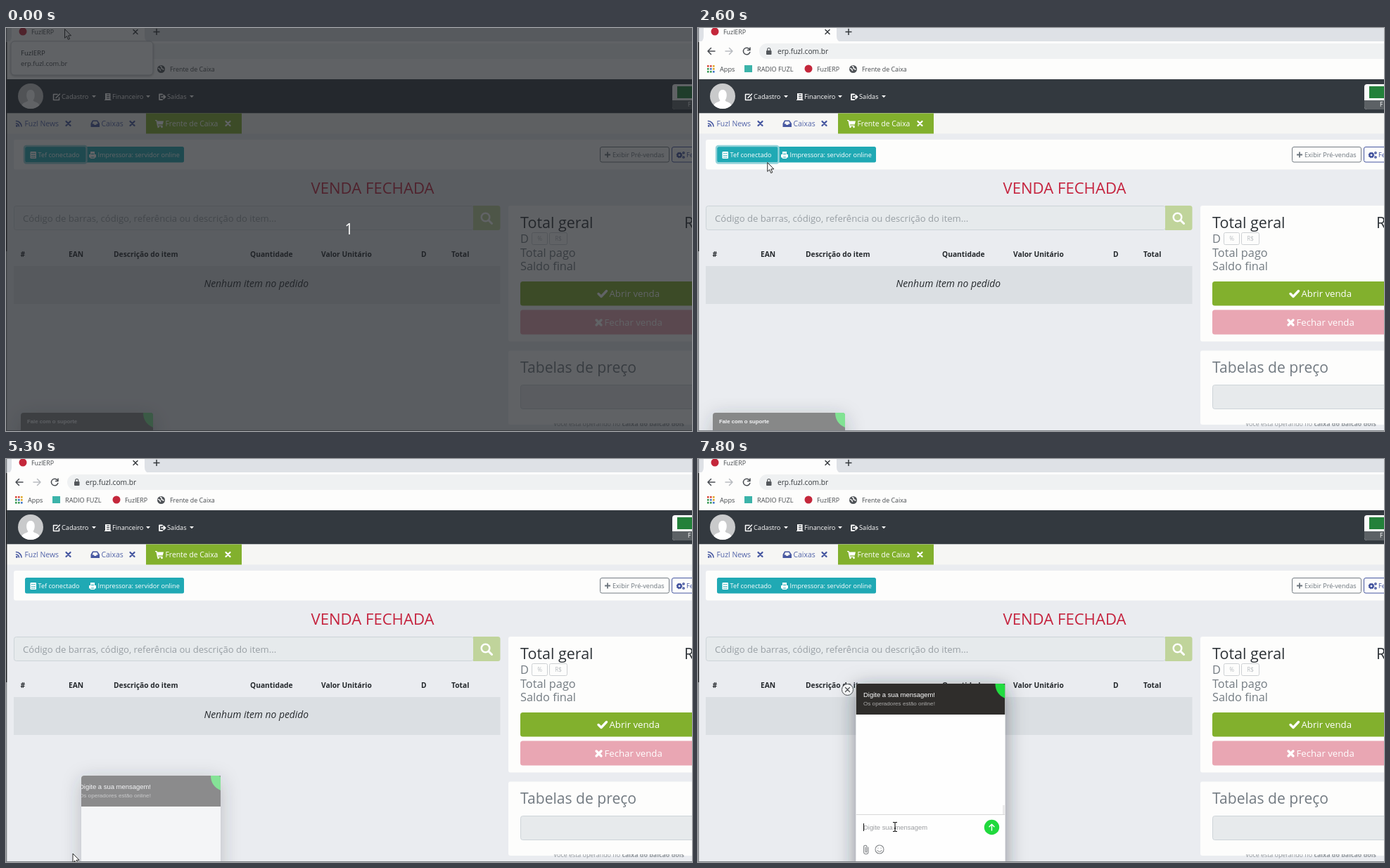
An HTML page for the animation above (8 s loop, 975 px wide and 574 px high).

```html
<!DOCTYPE html>
<html lang="pt-BR">
<head>
<meta charset="utf-8">
<title>Frente de Caixa</title>
<style>
html, body { margin: 0; width: 100%; height: 100%; overflow: hidden; background: #eaecf0; }
svg { display: block; width: 100%; height: 100%; }
text { font-family: "Open Sans", "Noto Sans", sans-serif; white-space: pre; }
.chat text { font-family: "Liberation Sans", Arial, sans-serif; }
.th text { font-size: 10.25px; font-weight: 700; fill: #24282c; }
.line { fill: none; stroke-linecap: round; stroke-linejoin: round; }
</style>
</head>
<body>
<svg viewBox="0 0 975 574" xmlns="http://www.w3.org/2000/svg">
  <defs>
    <filter id="soft" x="-40%" y="-40%" width="180%" height="180%">
      <feDropShadow dx="0" dy="6" stdDeviation="14" flood-color="#1c2630" flood-opacity=".5"/>
    </filter>
    <filter id="tipShade" x="-10%" y="-20%" width="120%" height="150%">
      <feDropShadow dx="0" dy="1" stdDeviation="1.5" flood-opacity=".3"/>
    </filter>
    <clipPath id="popClip"><rect id="popClipBox" width="212" height="260"/></clipPath>
    <clipPath id="footClip"><rect x="714" y="563" width="261" height="10"/></clipPath>
    <path id="cross" class="line" d="M-3-3L3 3M3-3L-3 3"/>
    <path id="caret" d="M-3-1.5H3L0 1.7z" fill="#fff"/>
    <path id="leaf" d="M198 0H208.500Q212 0 212 3.500V21C203 17 198 10 198 0z" fill="#22db40"/>
  </defs>

  <rect width="975" height="574" fill="#eaecf0"/>

  <!-- browser -->
  <rect width="975" height="20" fill="#dee1e6"/>
  <path d="M2 20Q8 19 8 12V0H197V12Q197 19 204 20z" fill="#fdfdfd"/>
  <rect y="19" width="975" height="54" fill="#fdfdfc"/>
  <circle cx="24" cy="5" r="5.5" fill="#c4273b"/>
  <text x="36" y="8.500" font-size="8.85" fill="#45494d">FuzlERP</text>
  <use href="#cross" x="184" y="5.500" stroke="#35393d" stroke-width="1.5"/>
  <path d="M209.500 5.500H218.500M214 1V10" stroke="#35393d" stroke-width="1.5"/>
  <g class="line" stroke="#4b4f54" stroke-width="1.5">
    <path d="M24 33H14M18.500 28.500L14 33L18.500 37.500"/>
    <path d="M39 33H49M44.500 28.500L49 33L44.500 37.500" stroke="#b9bcc0"/>
    <path d="M73 30A4.800 4.800 0 1 0 73.800 34.500M74 28V31.500H70.500"/>
  </g>
  <rect x="87" y="22" width="920" height="22" rx="11" fill="#eff1f2"/>
  <rect x="97" y="32" width="7.500" height="6" rx="1" fill="#53575b"/>
  <path d="M98.700 32V30.500a2 2 0 0 1 4 0V32" fill="none" stroke="#53575b" stroke-width="1.2"/>
  <text x="113" y="36.800" font-size="10.2" fill="#34383c">erp.fuzl.com.br</text>
  <g id="apps"></g>
  <text x="31" y="61.500" font-size="9.2" fill="#45494d">Apps</text>
  <rect x="66" y="53" width="11" height="10" fill="#3bb3a9"/>
  <text x="84" y="61.500" font-size="9.15" fill="#45494d">RADIO FUZL</text>
  <circle cx="157" cy="58" r="5.500" fill="#c4273b"/>
  <text x="169" y="61.500" font-size="8.85" fill="#45494d">FuzlERP</text>
  <circle cx="220.500" cy="58.500" r="5.500" fill="#4f5357"/>
  <path d="M216.500 57.500Q219 58 219.500 60.500M219.500 54.500Q222 55.500 221 57.500L224 59" class="line" stroke="#f4f4f4" stroke-width="1.5"/>
  <text x="233" y="61.500" font-size="8.85" fill="#45494d">Frente de Caixa</text>

  <!-- navigation bar -->
  <rect y="73" width="975" height="48.500" fill="#33393f"/>
  <circle cx="35" cy="97" r="18" fill="#c9cacb"/>
  <path d="M22.500 110C24 105 30 106 31.500 103C28 99 28 88 35 88S42 99 38.500 103C40 106 46 105 47.500 110A18 18 0 0 1 22.500 110z" fill="#fff"/>
  <g class="line" stroke="#fff" stroke-width="1.500">
    <path d="M73 94.500H67.500V102.500H75.500V99M71 99.500L76.500 94"/>
    <path d="M222 94.500H218V102H222M221 98.200H226M224 95.700L226.500 98.200L224 100.700" stroke-width="1.800"/>
  </g>
  <path d="M141 93H148.500V102H149.500V103H140V102H141z" fill="#fff"/>
  <path d="M143 95H147M143 97.500H147M143 100H147" stroke="#33393f"/>
  <g font-size="9.2" fill="#fff">
    <text x="79" y="101.300">Cadastro</text>
    <text x="151" y="101.300">Financeiro</text>
    <text x="229" y="101.300">Saídas</text>
  </g>
  <use href="#caret" x="125" y="97.500"/>
  <use href="#caret" x="202" y="97.500"/>
  <use href="#caret" x="264" y="97.500"/>
  <rect x="947" y="80" width="40" height="36" rx="4" fill="#fbfbfb"/>
  <path d="M947 103H975V116H951Q947 116 947 112z" fill="#5c6165"/>
  <rect x="954" y="83" width="21" height="17" fill="#23813a"/>
  <text x="969" y="112" font-size="8.5" fill="#fff">F</text>

  <!-- page tabs -->
  <rect y="121.500" width="975" height="29" fill="#f6f6f4"/>
  <rect x="199" y="121.500" width="136" height="29" fill="#82b02d"/>
  <g class="line" stroke="#4657a0" stroke-width="1.600">
    <path d="M14.500 132.500A8 8 0 0 1 22 140M14.500 136A4.500 4.500 0 0 1 18.500 140"/>
    <circle cx="15.300" cy="139.500" r=".6"/>
  </g>
  <path d="M123 131.500H130L133 136V141H120.500V136zM124 133L122.500 136.500H124.500L125.500 138H128L129 136.500H131L129.300 133z" fill="#4657a0" fill-rule="evenodd"/>
  <g font-size="10.4" fill="#5264a9">
    <text x="26.500" y="140">Fuzl News</text>
    <text x="135.500" y="140">Caixas</text>
    <text x="226.500" y="140" fill="#fff">Frente de Caixa</text>
  </g>
  <use href="#cross" x="88.500" y="136" stroke="#4657a0" stroke-width="2.300"/>
  <use href="#cross" x="179.500" y="136" stroke="#4657a0" stroke-width="2.300"/>
  <use href="#cross" x="315.500" y="136" stroke="#fff" stroke-width="2.300"/>
  <path d="M212 131H214.500L215 132.500H224L222.700 137.500H216L216.300 138.700H222.500V140H215L213.500 132.300H212z" fill="#fff"/>
  <circle cx="216.500" cy="141" r="1.300" fill="#fff"/>
  <circle cx="221.500" cy="141" r="1.300" fill="#fff"/>

  <!-- status card -->
  <rect x="11" y="159" width="980" height="42.500" rx="3" fill="#fdfdfc"/>
  <rect x="27" y="169" width="226" height="22.500" rx="2.500" fill="#20a9b4"/>
  <rect id="hot" x="27" y="169" width="87" height="22.500" rx="2.500" fill="#168f9c"/>
  <rect id="ring" x="26" y="168" width="88.500" height="24.500" rx="3" fill="none" stroke="#94d3da" stroke-width="2.400"/>
  <rect x="34.500" y="176" width="8.500" height="10" rx="1" fill="#fff"/>
  <path d="M36 178.500H41.500M36 181.500H41.500M36 184H41.500" stroke="#20a9b4" stroke-width="1.200" stroke-dasharray="1.500 .5"/>
  <path d="M120 180V176H126V180H128V184.500H126V186H120V184.500H118V180z" fill="#fff"/>
  <path d="M121 179.500H125M121 184H125" stroke="#20a9b4"/>
  <g font-size="9.1" fill="#fff">
    <text x="45.500" y="184.300">Tef conectado</text>
    <text x="130.500" y="184.300">Impressora: servidor online</text>
  </g>
  <rect x="844.500" y="169.500" width="98" height="21.500" rx="2.500" fill="none" stroke="#747c83"/>
  <path d="M851 180.500H859M855 176.500V184.500" stroke="#6c757d" stroke-width="1.800"/>
  <text x="862" y="184.300" font-size="9.15" fill="#6c757d">Exibir Pré-vendas</text>
  <rect x="946.500" y="169.500" width="60" height="21.500" rx="2.500" fill="none" stroke="#4657a0"/>
  <g fill="none" stroke="#3c4d9b">
    <circle cx="957" cy="181" r="2.600" stroke-width="2.200"/>
    <circle cx="957" cy="181" r="3.900" stroke-dasharray="1.500 1.560"/>
    <circle cx="963" cy="177.800" r="1.200" stroke-width="1.300"/>
    <circle cx="963" cy="184" r="1.200" stroke-width="1.300"/>
  </g>
  <text x="967" y="184.300" font-size="9.15" fill="#3c4d9b">Fechar</text>

  <!-- sale area -->
  <text x="433.500" y="236.300" font-size="22.1" fill="#c5243f">VENDA FECHADA</text>
  <rect x="11.500" y="253.500" width="653" height="34" rx="3" fill="#e6eaec" stroke="#cdd4d8"/>
  <text x="24" y="276" font-size="13.08" fill="#989fa4">Código de barras, código, referência ou descrição do item...</text>
  <path d="M664 253H699Q702.500 253 702.500 256.500V284.500Q702.500 288 699 288H664z" fill="#c0d49b"/>
  <circle cx="681.500" cy="269.500" r="5.800" fill="none" stroke="#fff" stroke-width="2.500"/>
  <path d="M686 274L690.500 278.500" class="line" stroke="#fff" stroke-width="3"/>
  <g class="th">
    <text x="20.500" y="326">#</text>
    <text x="89" y="326">EAN</text>
    <text x="153" y="326">Descrição do item</text>
    <text x="347" y="326">Quantidade</text>
    <text x="448" y="326">Valor Unitário</text>
    <text x="590" y="326">D</text>
    <text x="633" y="326">Total</text>
  </g>
  <rect x="11" y="339" width="691.500" height="54" fill="#dbdfe3"/>
  <text x="281.500" y="369.200" font-size="13.9" font-style="italic" fill="#262a2e">Nenhum item no pedido</text>

  <!-- totals -->
  <rect x="714" y="253" width="280" height="193.500" rx="3" fill="#fdfdfc"/>
  <text x="731" y="285" font-size="21.5" fill="#2e3338">Total geral</text>
  <text x="964" y="285" font-size="21.5" fill="#2e3338">R$</text>
  <g font-size="16.3" fill="#737b82">
    <text x="731" y="305.500">D</text>
    <text x="731" y="325.500">Total pago</text>
    <text x="731" y="345">Saldo final</text>
  </g>
  <g fill="none" stroke="#cdd0d3">
    <rect x="747.500" y="291.500" width="22" height="17" rx="2"/>
    <rect x="772.500" y="291.500" width="25" height="17" rx="2"/>
  </g>
  <g font-size="8.2" fill="#b9bdc1" text-anchor="middle">
    <text x="758.500" y="303">%</text>
    <text x="785" y="303">R$</text>
  </g>
  <rect x="731" y="361" width="260" height="34.500" rx="3.500" fill="#82b02d"/>
  <rect x="731" y="401.500" width="260" height="35" rx="3.500" fill="#e9a6b3"/>
  <path d="M842 378.500L846 382.500L853.500 374.500" class="line" stroke="#fff" stroke-width="3.400"/>
  <use href="#cross" transform="translate(842.500 419.500) scale(1.150)" stroke="#fff" stroke-width="3"/>
  <g font-size="13.2" fill="#fff">
    <text x="857.500" y="383.300">Abrir venda</text>
    <text x="850.500" y="424.200">Fechar venda</text>
  </g>
  <rect x="714" y="459.500" width="280" height="105.500" rx="3" fill="#fdfdfc"/>
  <text x="731" y="491" font-size="21.1" fill="#737b82">Tabelas de preço</text>
  <rect x="731.500" y="508.500" width="260" height="34" rx="3" fill="#e7eaec" stroke="#ced4d9"/>
  <text x="778" y="566.500" font-size="8.9" fill="#90969b" clip-path="url(#footClip)">Você está operando no <tspan font-weight="700">caixa do balcão dois</tspan></text>

  <!-- tab hint -->
  <g id="hint">
    <rect x="7" y="19" width="202" height="48" rx="5" fill="#fefefe" stroke="#b9bcc0" stroke-width=".8" filter="url(#tipShade)"/>
    <text x="21" y="38.500" font-size="9.6" fill="#2b2f33">FuzlERP</text>
    <text x="21" y="54" font-size="9.37" fill="#3d4145">erp.fuzl.com.br</text>
  </g>

  <!-- chat -->
  <g class="chat">
    <g id="label">
      <path d="M21 600V552Q21 548 25 548H205Q209 548 209 552V600z" fill="#2f2d2b" filter="url(#soft)"/>
      <use href="#leaf" x="-3" y="548"/>
      <text x="30" y="563" font-size="7.75" font-weight="700" fill="#fff">Fale com o suporte</text>
    </g>
    <g id="pop">
      <rect id="popBack" width="212" height="300" rx="4" fill="#fefefe" filter="url(#soft)"/>
      <g clip-path="url(#popClip)">
        <path d="M0 44V4Q0 0 4 0H212V44z" fill="#2f2d2b"/>
        <g id="title">
          <text x="10.500" y="19.300" font-size="9.46" fill="#fff">Digite a sua mensagem!</text>
          <text x="10.500" y="30.500" font-size="8.12" fill="#a9a8a7">Os operadores estão online!</text>
        </g>
        <use id="popLeaf" href="#leaf"/>
        <rect x="208.500" y="173" width="3.500" height="13" fill="#ebebeb"/>
        <path d="M0 186.500H212" stroke="#d9d9d9"/>
        <text x="10.500" y="207.800" font-size="9.41" fill="#9b9da0">Digite sua mensagem</text>
        <circle cx="193" cy="204.500" r="10.700" fill="#20d93d"/>
        <path d="M193 209V200.500M189.500 203.800L193 200.300L196.500 203.800" class="line" stroke="#fff" stroke-width="1.400"/>
        <g class="line" stroke="#85888b" stroke-width="1.100">
          <path d="M17.500 233V239.500a3.200 3.200 0 0 1-6.400 0V232.500a2.200 2.200 0 0 1 4.400 0V239a1 1 0 0 1-2 0V233"/>
          <circle cx="33.500" cy="236" r="6"/>
          <path d="M30.500 237.500Q33.500 241 36.500 237.500M31.400 234V234.300M35.600 234V234.300"/>
        </g>
      </g>
      <g id="close">
        <circle cx="-12" cy="8.500" r="8" fill="#f3f4f5" stroke="#4a4d50"/>
        <use href="#cross" x="-12" y="8.500" stroke="#4a4d50" stroke-width="1.200"/>
      </g>
    </g>
    <path id="typeMark" d="M235.500 519V530" stroke="#111"/>
  </g>

  <!-- window edge -->
  <rect width="1.300" height="574" fill="#7d8186"/>
  <rect y="20" width="1.300" height="298" fill="#17191b"/>
  <rect y="573" width="975" height="1" fill="#7d8186"/>

  <path id="arrow" d="M0 0V12.800L2.900 10.100L4.900 14.900L7 14L5 9.300H9z" fill="#fff" stroke="#111" stroke-width=".9" stroke-linejoin="round"/>
  <path id="beam" d="M-3-6.500H-1L0-5.700L1-6.500H3M0-5.700V5.700M-3 6.500H-1L0 5.700L1 6.500H3M-1.500 2H1.500" fill="none" stroke="#111" stroke-width="1.100"/>

  <g id="shade">
    <rect width="975" height="574" fill="#1e2226" opacity=".7"/>
    <text x="487.500" y="294" font-size="21" fill="#fff" text-anchor="middle">1</text>
  </g>
</svg>
<script>
const LOOP = 8000, TICK = 100;
const el = id => document.getElementById(id);
const ramp = (t, a, b) => Math.min(1, Math.max(0, (t - a) / (b - a)));
const show = (id, on) => { el(id).style.opacity = +on; };
const move = (id, x, y) => el(id).setAttribute('transform', `translate(${x} ${y})`);

const linear = u => u, easeIn = u => u * u, easeOut = u => u * (2 - u);

// pointer stops: time, x, y, easing towards the stop
const stops = [
  [1899, 83.5, 1.5, linear],
  [1900, 98, 7.5, linear],
  [2700, 99, 248, easeIn],
  [3600, 95.5, 539.5, easeOut],
  [4000, 95, 562, easeOut],
  [5500, 95, 562, linear],
  [6200, 124.5, 556, easeIn],
  [6400, 172, 546, linear],
  [7000, 276, 525, easeOut],
  [7200, 280, 524, linear]
];

function pointer(t) {
  const i = stops.findIndex(s => s[0] >= t);
  if (i < 0) return stops[stops.length - 1].slice(1, 3);
  if (i === 0) return stops[0].slice(1, 3);
  const [t0, x0, y0] = stops[i - 1], [t1, x1, y1, ease] = stops[i];
  const u = ease(ramp(t, t0, t1));
  return [x0 + (x1 - x0) * u, y0 + (y1 - y0) * u];
}

function placePopup(t) {
  const u = ramp(t, 5300, 5400);
  const mix = (a, b) => a + (b - a) * u;
  const w = mix(198, 212);
  move('pop', mix(107, 224.5), mix(451, 320));
  move('title', mix(-13.5, 0), 0);
  move('popLeaf', w - 212, 0);
  el('popBack').setAttribute('width', w);
  el('popClipBox').setAttribute('width', w);
  show('close', u === 1);
  show('pop', t < 5300 ? 0 : 0.5 + 0.5 * ramp(t, 6500, 7000));
}

function draw(now) {
  const t = Math.floor((now % LOOP) / TICK) * TICK;
  const [x, y] = pointer(t);
  show('shade', t < 400);
  show('hint', t < 2200);
  show('hot', x > 27 && x < 114 && y > 169 && y < 191);
  show('ring', 1 - ramp(t, 4800, 5100));

  move('label', 0, 30 * ramp(t, 4800, 5100));
  show('label', t >= 5100 ? 0 : 0.52 + 0.48 * ramp(t, 3600, 4000));
  placePopup(t);

  const typing = x > 230;
  move('arrow', x, y);
  move('beam', x, y);
  show('arrow', !typing);
  show('beam', typing);
  show('typeMark', (t >= 6700 && t < 7200) || t >= 7800);
}

// bookmark grid
el('apps').innerHTML = Array.from({ length: 9 }, (_, i) => {
  const c = ['#d9483b', '#d9483b', '#e0a92e', '#3a9b57', '#4377c9', '#e0a92e', '#3a9b57', '#3a9b57', '#4377c9'][i];
  return `<rect x="${13 + i % 3 * 4}" y="${53 + Math.floor(i / 3) * 4}" width="2.600" height="2.600" fill="${c}"/>`;
}).join('');

const start = performance.now();
function loop() {
  draw(performance.now() - start);
  requestAnimationFrame(loop);
}
loop();
</script>
</body>
</html>
```
